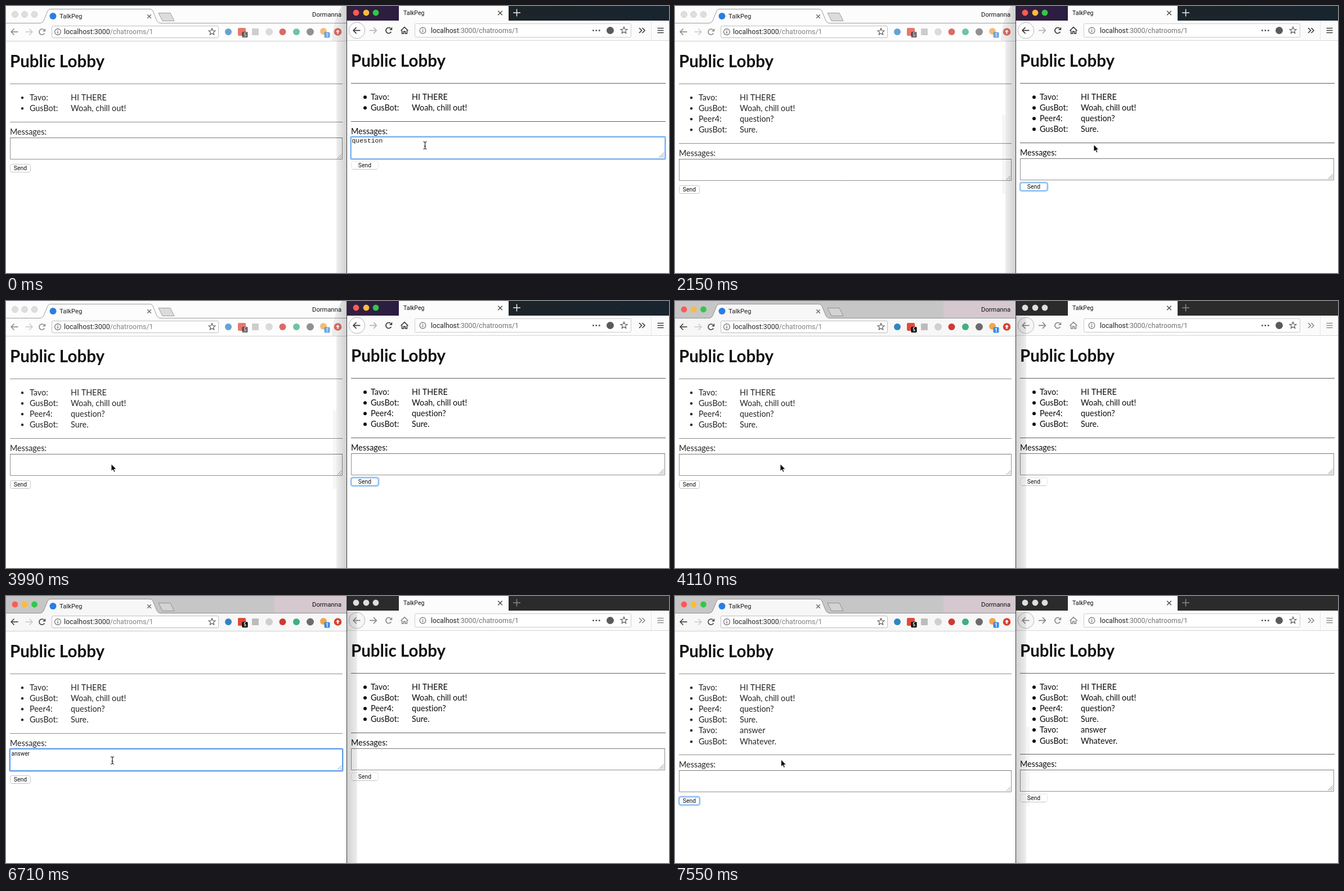
Write an HTML page with a canvas that moves like this. It is 1178x475 px and loops after 8000 ms.

```html
<!DOCTYPE html>
<html lang="en">
<head>
<meta charset="utf-8">
<title>Chat demo</title>
<style>
html, body { margin: 0; width: 100%; height: 100%; overflow: hidden; background: #fff; }
canvas { display: block; }
</style>
</head>
<body>
<canvas id="stage" width="1178" height="475"></canvas>
<script>
const ctx = document.getElementById('stage').getContext('2d');
ctx.letterSpacing = '0.01px'; // switches ligatures off
const LOOP = 8000, ROW = 19.1, SPLIT = 605;
const UI = 'Roboto, sans-serif', PAGE = 'Lato, sans-serif', MONO = '"Liberation Mono", monospace';
const APP = 'TalkPeg', PROFILE = 'Dormanna';
const CHAT = [
  ['Tavo:', 'HI THERE'], ['GusBot:', 'Woah, chill out!'],
  ['Peer4:', 'question?'], ['GusBot:', 'Sure.'],
  ['Tavo:', 'answer'], ['GusBot:', 'Whatever.']
];
const ROW_TIMES = [0, 0, 2090, 2150, 7370, 7460];
const KEY_TIMES = [5220, 5280, 5580, 5820, 6120, 6230];

// Drawing helpers
function rect(x, y, w, h, color) {
  ctx.fillStyle = color;
  ctx.fillRect(x, y, w, h);
}

function box(x, y, w, h, r, fill, stroke, lw = 1) {
  ctx.beginPath();
  ctx.roundRect(x, y, w, h, r);
  if (fill) { ctx.fillStyle = fill; ctx.fill(); }
  if (stroke) { ctx.strokeStyle = stroke; ctx.lineWidth = lw; ctx.stroke(); }
}

function dot(x, y, r, fill, stroke, lw = 1) {
  box(x - r, y - r, 2 * r, 2 * r, r, fill, stroke, lw);
}

function line(points, color, lw = 1) {
  ctx.beginPath();
  for (let i = 0; i < points.length; i += 2) ctx.lineTo(points[i], points[i + 1]);
  ctx.strokeStyle = color;
  ctx.lineWidth = lw;
  ctx.stroke();
}

function shape(points, fill, stroke, lw = 1) {
  ctx.beginPath();
  for (let i = 0; i < points.length; i += 2) ctx.lineTo(points[i], points[i + 1]);
  ctx.closePath();
  if (fill) { ctx.fillStyle = fill; ctx.fill(); }
  if (stroke) { ctx.strokeStyle = stroke; ctx.lineWidth = lw; ctx.stroke(); }
}

function fade(x1, from, x2, to) {
  const g = ctx.createLinearGradient(x1, 0, x2, 0);
  g.addColorStop(0, from);
  g.addColorStop(1, to);
  return g;
}

function text(str, x, y, font, color, align = 'left') {
  ctx.font = font;
  ctx.fillStyle = color;
  ctx.textAlign = align;
  ctx.fillText(str, x, y);
  return ctx.measureText(str).width;
}

// Icons
function cross(x, y, r, color, lw = 1.3) {
  line([x - r, y - r, x + r, y + r], color, lw);
  line([x - r, y + r, x + r, y - r], color, lw);
}

function arrow(x, y, dir, color) {
  line([x - 6 * dir, y, x + 6 * dir, y], color, 1.7);
  line([x + dir, y - 5.5, x + 6.3 * dir, y, x + dir, y + 5.5], color, 1.7);
}

function reload(x, y, color) {
  ctx.beginPath();
  ctx.arc(x, y, 5, 0.5, 5.4);
  ctx.strokeStyle = color;
  ctx.lineWidth = 1.7;
  ctx.stroke();
  shape([x + 6.2, y - 6, x + 6.2, y - 0.8, x + 1, y - 0.8], color);
}

function home(x, y, color) {
  line([x - 6.5, y + 0.5, x, y - 5.8, x + 6.5, y + 0.5], color, 1.6);
  line([x - 4.4, y, x - 4.4, y + 5.6, x - 1.4, y + 5.6, x - 1.4, y + 1.8,
    x + 1.4, y + 1.8, x + 1.4, y + 5.6, x + 4.4, y + 5.6, x + 4.4, y], color, 1.5);
}

function star(x, y, color) {
  const p = [];
  for (let i = 0; i < 10; i++) {
    const a = -Math.PI / 2 + i * Math.PI / 5, r = i % 2 ? 2.8 : 6.2;
    p.push(x + r * Math.cos(a), y + r * Math.sin(a));
  }
  shape(p, null, color, 1.2);
}

function info(x, y, color) {
  dot(x, y, 5.4, null, color, 1.1);
  rect(x - 0.6, y - 0.8, 1.3, 3.8, color);
  rect(x - 0.6, y - 3, 1.3, 1.3, color);
}

function badge(x, y, label, color) {
  box(x - 5, y - 5, 10, 10, 1.5, color);
  text(label, x, y + 3.3, '700 9px ' + UI, '#fff', 'center');
}

function lights(xs, y, active, idle, edge) {
  const colors = ['#fc5b55', '#fdbb3d', '#33c748'];
  xs.forEach((x, i) => dot(x, y, 5.4, active ? colors[i] : idle, active ? null : edge));
}

// Left browser frame
function leftChrome(active) {
  const ink = active ? '#454545' : '#8c8c8c', edge = active ? '#8f8f8f' : '#9c9c9c';
  const bar = active ? '#f7f7f7' : '#fdfdfd';
  rect(0, 0, SPLIT, 30, active ? '#c6c6c6' : '#fcfcfc');
  if (active) rect(477, 0, SPLIT - 477, 30, '#d5c8cf');
  rect(0, 30, SPLIT, 32, bar);
  rect(0, 62, SPLIT, 1, '#cfcfcf');
  lights([16, 33, 50.5], 15, active, '#dedede', '#d0d0d0');

  ctx.beginPath();
  ctx.moveTo(0, 30.5);
  ctx.lineTo(61, 30.5);
  ctx.quadraticCurveTo(65, 30, 67, 26);
  ctx.lineTo(74, 9);
  ctx.quadraticCurveTo(76, 5.5, 79, 5.5);
  ctx.lineTo(256, 5.5);
  ctx.quadraticCurveTo(259.5, 5.5, 261, 9);
  ctx.lineTo(268, 26);
  ctx.quadraticCurveTo(270, 30, 274, 30.5);
  ctx.fillStyle = bar;
  ctx.fill();
  ctx.lineTo(SPLIT, 30.5);
  ctx.strokeStyle = edge;
  ctx.lineWidth = 1;
  ctx.stroke();
  shape([271, 12.5, 292, 12.5, 299, 26.5, 278, 26.5], active ? '#d3d3d3' : '#dcdcdc', edge);

  dot(83.5, 18, 6, '#2a7de1');
  text(APP, 95, 22, '11.4px ' + UI, '#222');
  cross(254.5, 18.5, 3.3, '#666');
  text(PROFILE, 596, 19, '11.2px ' + UI, '#111', 'right');

  arrow(15.5, 46, -1, ink);
  arrow(40.5, 46, 1, '#cbcbcb');
  reload(64, 46, ink);
  box(81.5, 35.5, 296, 21, 2.5, '#fff', '#bebebe');
  info(92, 46, '#5c5c5c');
  const w = text('localhost:3000', 103, 50, '12.4px ' + UI, '#262626');
  text('/chatrooms/1', 103 + w, 50, '12.4px ' + UI, '#808080');
  star(366, 46, '#5a5a5a');

  ctx.globalAlpha = active ? 1 : 0.75;
  dot(395, 46, 6, '#3184c4');
  box(412, 39, 14, 14, 2, '#e04a3c');
  badge(424.5, 51, '5', active ? '#000' : '#333');
  box(437, 40, 12, 12, 1, '#bcbcbc');
  dot(467.5, 46, 6.5, '#cfcfcf');
  dot(491.5, 46, 6, '#cc3b33');
  dot(516, 46, 6, '#3fb07f');
  dot(540.5, 46, 6.5, '#6c6c6c');
  dot(564, 45, 6, '#f2a64a');
  badge(570.5, 51.5, '1', '#3c8be0');
  dot(589.5, 46, 6.8, '#d8402f');
  ctx.globalAlpha = 1;
  shape([589.5, 42, 593, 46, 590.7, 46, 590.7, 49.5, 588.3, 49.5, 588.3, 46, 586, 46], '#fff');
}

// Right browser frame
function rightChrome(active) {
  const ink = active ? '#333' : '#858585';
  rect(606, 0, 572, 26, '#2b2b2b');
  if (active) {
    rect(606, 0, 92, 26, fade(606, '#33213f', 698, '#2a1d40'));
    rect(893, 0, 285, 26, fade(893, '#1d2429', 1178, '#18252f'));
  }
  rect(698, 0, 195, 26, '#fcfcfc');
  rect(606, 26, 572, 35, '#fbfbfb');
  rect(606, 61, 572, 1, '#d6d6d6');
  lights([622, 640, 657], 12, active, '#dedede', null);
  text(APP, 706, 16, '10.5px ' + UI, '#111');
  cross(878, 12.5, 3.8, '#444');
  const plus = active ? '#f0f0f0' : '#8a8a8a';
  line([901, 12, 914, 12], plus, 1.5);
  line([907.5, 5.5, 907.5, 18.5], plus, 1.5);

  dot(623.5, 43.5, 14.3, active ? '#fff' : '#f6f6f6', '#b5b5b5');
  arrow(623.5, 43.5, -1, ink);
  arrow(652, 43.5, 1, active ? '#b0b0b0' : '#858585');
  reload(680, 43.5, ink);
  home(708, 43.5, ink);
  box(726.5, 31.5, 384, 24, 2, '#fff', '#cacaca');
  info(740.5, 43.5, '#6a6a6a');
  const w = text('localhost', 755, 48, '12.2px ' + UI, '#222');
  text(':3000/chatrooms/1', 755 + w, 48, '12.2px ' + UI, '#707070');
  for (let i = 0; i < 3; i++) dot(1043.5 + i * 5.4, 43.5, 1.5, '#555');
  dot(1073.5, 43.5, 6.5, '#5a5a5a');
  star(1098, 43.5, '#555');
  for (const x of [1125, 1130.5]) line([x, 39, x + 4.5, 43.5, x, 48], ink, 1.5);
  rect(1146, 27, 1, 34, '#e6e6e6');
  for (const y of [39.5, 43.5, 47.5]) line([1157.5, y, 1168.5, y], ink, 1.4);
}

// Chat page shared by both windows
function page(o, rows, field, focus) {
  const { x, y, w, ink, rule } = o, shift = (rows - 2) * ROW;
  const body = '14.35px ' + PAGE;
  text('Public Lobby', x, y + 109, '700 29.5px ' + PAGE, '#111');
  rect(x, y + 138, w, 1, rule);
  for (let i = 0; i < rows; i++) {
    const base = y + 168 + Math.round(i * ROW);
    dot(x + o.bullet, base - 4.8, o.bulletR, ink);
    text(CHAT[i][0], x + 35, base, body, ink);
    text(CHAT[i][1], x + 108, base, body, ink);
  }
  const top = Math.round(y + shift);
  rect(x, top + 206, w, 1, rule);
  text('Messages:', x, top + 229, body, ink);

  const ty = top + 234, tw = o.areaW;
  box(x + 0.5, ty + 0.5, tw - 1, 38, 0, '#fff', '#8f8f8f');
  rect(x, ty, tw, 1, '#777');
  if (focus === 'area') {
    box(x, ty, tw, 39, 1.5, null, o.ring, 2);
    box(x - 1, ty - 1, tw + 2, 41, 2, null, o.glow, 2);
  }
  for (const d of o.grip) line([x + tw - 2 - d, ty + 37, x + tw - 2, ty + 37 - d], '#888', 0.9);
  const fw = text(field.text, x + o.textX, ty + o.textY, o.areaFont, '#111');
  if (field.caret) rect(Math.round(x + o.textX + fw), ty + 2, 1, 11, '#111');

  const by = top + o.btnY;
  if (focus === 'button') {
    box(x, by, o.btnW, 15, 3.5, '#fff', '#a9cff9', 3);
    box(x + 0.5, by + 0.5, o.btnW - 1, 14, 3, null, '#78b2f2');
  } else {
    box(x + 0.5, by + 0.5, o.btnW - 1, 14, 3, '#fff', o.btnEdge);
    rect(x + 3, by + 14, o.btnW - 6, 1, '#c4c4c4');
  }
  text('Send', x + o.btnW / 2, by + 11, '10.4px ' + UI, '#111', 'center');
}

const LEFT = {
  x: 7, y: 0, w: 591, areaW: 591, ink: '#262626', rule: '#8c8c8c', bullet: 22, bulletR: 2.2,
  ring: '#5a9dea', glow: 'rgba(90,157,234,.35)', grip: [3, 7], textX: 2.6, textY: 12,
  areaFont: '10px ' + UI, btnY: 281, btnW: 37, btnEdge: '#c6c6c6'
};
const RIGHT = {
  x: 613, y: -1, w: 559, areaW: 558, ink: '#0c0c0c', rule: '#5e5e5e', bullet: 25, bulletR: 3,
  ring: '#7fb4f0', glow: 'rgba(127,180,240,.6)', grip: [3, 6, 9], textX: 1.5, textY: 10,
  areaFont: '11.4px ' + MONO, btnY: 277, btnW: 49, btnEdge: '#e6e6e6'
};

// Window shadow falls on whichever window is behind
function shadow(leftActive, rows) {
  const dark = 'rgba(0,0,0,.18)', soft = 'rgba(0,0,0,.065)', faint = 'rgba(0,0,0,.035)';
  if (leftActive) {
    rect(606, 27, 18, 448, fade(606, dark, 624, soft));
    if (rows > 4) rect(624, 233, 6, 141, faint);
    return;
  }
  const tone = fade(587, soft, SPLIT, dark);
  ctx.beginPath();
  ctx.moveTo(597, 0);
  ctx.quadraticCurveTo(582, 20, 579, 62);
  ctx.lineTo(SPLIT, 62);
  ctx.lineTo(SPLIT, 0);
  ctx.fillStyle = tone;
  ctx.fill();
  rect(587, 62, 18, 413, tone);
  if (rows > 2) rect(581, 194, 6, 140, faint);
}

function pointer(x, y) {
  shape([x, y, x, y + 12.6, x + 2.9, y + 10, x + 5, y + 14.4, x + 7, y + 13.5,
    x + 5, y + 9.2, x + 9, y + 9.2], '#000', '#fff', 0.9);
}

function beam(x, y) {
  line([x, y - 5.5, x, y + 5.5], '#222', 1.2);
  line([x - 1.8, y + 1.5, x + 1.8, y + 1.5], '#222');
  for (const s of [-1, 1]) {
    line([x - 3.2, y + 6.5 * s, x - 1.2, y + 6.2 * s, x, y + 5 * s,
      x + 1.2, y + 6.2 * s, x + 3.2, y + 6.5 * s], '#222', 1.1);
  }
}

function cursor(t) {
  if (t < 2150) return beam(744.5, 248);
  if (t >= 7550) return pointer(188.5, 291);
  if (t >= 4380) return beam(189, 292.5);
  const step = t < 3170 ? 0 : Math.min(14, 1 + Math.floor((t - 3170) / 58.5));
  const u = step / 14, s = u * u * (3 - 2 * u), r = 1 - s;
  pointer(744 - 557 * s, 246.5 * r * r + 2 * 347 * r * s + 290 * s * s);
}

function render(t) {
  const rows = ROW_TIMES.filter(at => t >= at).length;
  const leftActive = t >= 4050;
  const typed = KEY_TIMES.filter(at => t >= at).length;

  const leftField = {
    text: t < 7370 ? 'answer'.slice(0, typed) : '',
    caret: (t >= 4560 && t < 5040) || (t >= 5220 && t < 6710)
  };
  const rightField = {
    text: t < 1130 ? 'question' : t < 2090 ? 'question?' : '',
    caret: t >= 530 && t < 1490
  };
  const leftFocus = t < 4380 ? '' : t < 6890 ? 'area' : 'button';
  const rightFocus = leftActive ? '' : t < 1490 ? 'area' : 'button';

  rect(0, 0, 1178, 475, '#fff');
  leftChrome(leftActive);
  page(LEFT, rows, leftField, leftFocus);
  rightChrome(!leftActive);
  page(RIGHT, rows, rightField, rightFocus);
  shadow(leftActive, rows);
  rect(SPLIT, 0, 1, 475, '#3a3a3a');
  cursor(t);
}

function tick() {
  render(performance.now() % LOOP);
  requestAnimationFrame(tick);
}
tick();
</script>
</body>
</html>
```
